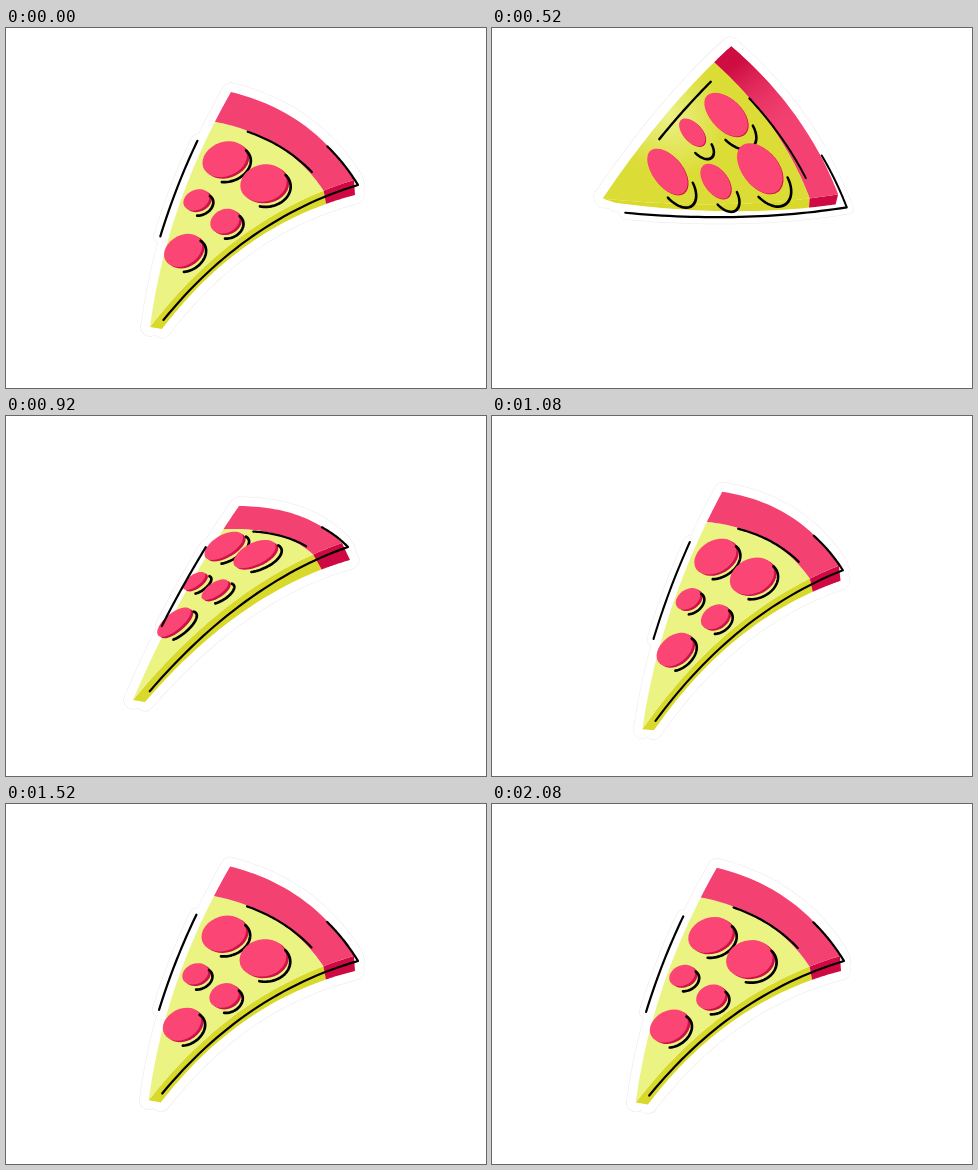
An HTML page with a canvas that plays this animation: 480x360 px, repeating every 2120 ms.

```html
<!DOCTYPE html>
<html lang="en">
<head>
<meta charset="utf-8">
<title>Pizza sticker</title>
<style>
html, body { margin: 0; width: 100%; height: 100%; overflow: hidden; background: #fff; }
canvas { display: block; }
</style>
</head>
<body>
<canvas id="stage" width="480" height="360"></canvas>
<script>
const ctx = document.getElementById('stage').getContext('2d');
const LOOP = 2120, STEP = 40, LANDING = 1120;
const SPREAD = .62;          // angle of the slice at its tip
const CRUST = .87;           // where the crust begins, from tip 0 to rim 1
const TIP_DEPTH = [12, 2];
const PIVOT = 351;

// A pose: tip, left and right corners, bends of the left and right edges, bulge;
// depth at the rim, offset of the ink, slide of the toppings; gap of the edge line, shade.
const rest = [144,299, 225,64, 348,152, 160,178, 229,188, 10,-12, 1,15, 4,5, 0,0, .05, 0];
const edge = [139,292, 281,104, 315,84, 172,124, 228,184, 3,-6, 9,14, 0,-1, -8,11, .1, 0];
const flip = [99,204, 230,30, 350,178, 168,108, 235,207, 12,-7, -4,10, 10,13, 9,8, 0, 1];
const turn = [127,284, 233,90, 336,127, 172,178, 224,166, 8,-9, 8,17, 6,4, -4,-8, .07, 0];

// Toppings: distance from the tip, share of the spread, radius.
const toppings = [
  [.73, .22, .08], [.71, .66, .088], [.54, .17, .047], [.495, .66, .057], [.325, .35, .072]
];

const lerp = (a, b, k) => a + (b - a) * k;
const mix = (a, b, k) => a.map((v, i) => lerp(v, b[i], k));
const add = (a, b, k = 1) => a.map((v, i) => v + b[i] * k);
const bend = (a, c, b, k) => mix(mix(a, c, k), mix(c, b, k), k);
const curve = f => Array.from({ length: 33 }, (_, i) => f(i / 32));

const key = (t, pose, swayX = 0, swayY = 0) => ({ t, v: [...pose, swayX, swayY] });
const keys = [
  key(0, rest),
  key(120, mix(rest, edge, .2), 1, 4),
  key(320, edge),
  key(540, mix(edge, flip, .92), 6, -36),
  key(720, flip),
  key(920, turn),
  key(LANDING, rest, 8, 16)
];

const slope = (n, i) => (keys[n + 1].v[i] - keys[n].v[i]) / (keys[n + 1].t - keys[n].t);
// Limited tangents keep the motion from overshooting its keys.
function tangent(n, i) {
  if (n === 0 || n === keys.length - 1) return 0;
  const a = slope(n - 1, i), b = slope(n, i);
  return a * b <= 0 ? 0 : 2 * a * b / (a + b);
}

function poseAt(t) {
  if (t >= LANDING) {
    const d = t - LANDING;
    const wobble = Math.exp(-d / 270) * Math.cos(2 * Math.PI * d / 640);
    return [...rest, 8 * wobble, 16 * wobble];
  }
  const n = keys.findIndex(k => k.t > t) - 1;
  const a = keys[n], b = keys[n + 1], d = b.t - a.t, u = (t - a.t) / d;
  const h = u * u * (3 - 2 * u);
  return a.v.map((v, i) => lerp(v, b.v[i], h)
    + d * u * (1 - u) * ((1 - u) * tangent(n, i) - u * tangent(n + 1, i)));
}

function trace(points) {
  const p = new Path2D();
  for (const q of points) p.lineTo(...q);
  return p;
}

function fill(path, style) {
  ctx.fillStyle = style;
  ctx.fill(path);
}

function stroke(path, style, width) {
  ctx.strokeStyle = style;
  ctx.lineWidth = width;
  ctx.stroke(path);
}

function draw(t) {
  const v = poseAt(t);
  const [tip, left, right, leftBend, rightBend, bulge, depth, ink, slide] =
    curve(() => 0).slice(0, 9).map((_, i) => v.slice(2 * i, 2 * i + 2));
  const [gap, shade, swayX, swayY] = v.slice(18);

  // Slice surface: r runs from tip to rim, s from the left edge to the right.
  const at = (r, s) => add(
    mix(bend(tip, leftBend, left, r), bend(tip, rightBend, right, r), s),
    bulge, 4 * s * (1 - s) * r);
  const flat = (x, y) => at(Math.hypot(x, y), Math.atan2(y, x) / SPREAD);
  const under = r => add(at(r, 1), mix(TIP_DEPTH, depth, r));

  const patch = (r0, r1) => trace([
    ...curve(s => at(r1, s)),
    ...curve(u => at(lerp(r1, r0, u), 1)),
    ...curve(s => at(r0, 1 - s)),
    ...curve(u => at(lerp(r0, r1, u), 0))
  ]);
  const side = (r0, r1) => trace([
    ...curve(u => at(lerp(r0, r1, u), 1)),
    ...curve(u => under(lerp(r1, r0, u)))
  ]);
  const disc = ([r, s, size], shift, from = 0, to = 2 * Math.PI) => trace(curve(u => {
    const a = lerp(from, to, u), b = s * SPREAD;
    return add(flat(r * Math.cos(b) + size * Math.cos(a), r * Math.sin(b) + size * Math.sin(a)), shift);
  }));
  const inked = f => curve(u => add(f(u), ink));
  const lines = [
    trace(inked(u => flat(lerp(.8, .4, u), -gap))),
    trace(inked(u => at(.88, lerp(.2, .78, u)))),
    trace([...inked(u => at(1, lerp(.68, 1, u))), ...inked(u => at(lerp(1, .055, u), 1))])
  ];

  ctx.setTransform(1, 0, 0, 1, 0, 0);
  ctx.fillStyle = '#fff';
  ctx.fillRect(0, 0, 480, 360);
  // The slice sways around its right-hand corner.
  ctx.setTransform(1 - swayX / 200, -swayY / 200, 0, 1, swayX * PIVOT / 200, swayY * PIVOT / 200);
  ctx.lineCap = ctx.lineJoin = 'round';

  for (const [style, extra] of [['#e9e9e9', 1], ['#fff', 0]]) {
    for (const p of [patch(0, 1), side(0, 1)]) stroke(p, style, 18 + extra);
    for (const l of lines) stroke(l, style, 13 + extra);
  }

  const face = patch(0, CRUST), crust = patch(CRUST, 1);
  fill(side(0, CRUST), '#d9d92b');
  fill(side(CRUST, 1), '#cf0a43');
  fill(face, '#ebf383');
  fill(crust, '#f34272');
  if (shade > 0) {
    ctx.globalAlpha = shade;
    const [x, y] = at(.5, 0);
    const glow = ctx.createRadialGradient(x, y, 4, x, y, 62);
    glow.addColorStop(0, '#ebf083');
    glow.addColorStop(1, '#d9d92b');
    fill(face, glow);
    const dusk = ctx.createLinearGradient(...left, ...right);
    dusk.addColorStop(.1, '#c9073c');
    dusk.addColorStop(.6, '#f3427200');
    fill(crust, dusk);
    ctx.globalAlpha = 1;
  }

  for (const o of toppings) {
    fill(disc(o, add(slide, [2.5, 1.5], 1 - .7 * shade)), '#cf1148');
    fill(disc(o, slide), '#fb4575');
    stroke(disc(o, add(slide, ink), .5, 3.1), '#000', 2.7);
  }
  for (const l of lines) stroke(l, '#000', 2.2);
}

const begin = performance.now();
function tick() {
  const t = (performance.now() - begin) % LOOP;
  draw(Math.floor(t / STEP) * STEP);
  requestAnimationFrame(tick);
}
tick();
</script>
</body>
</html>
```
